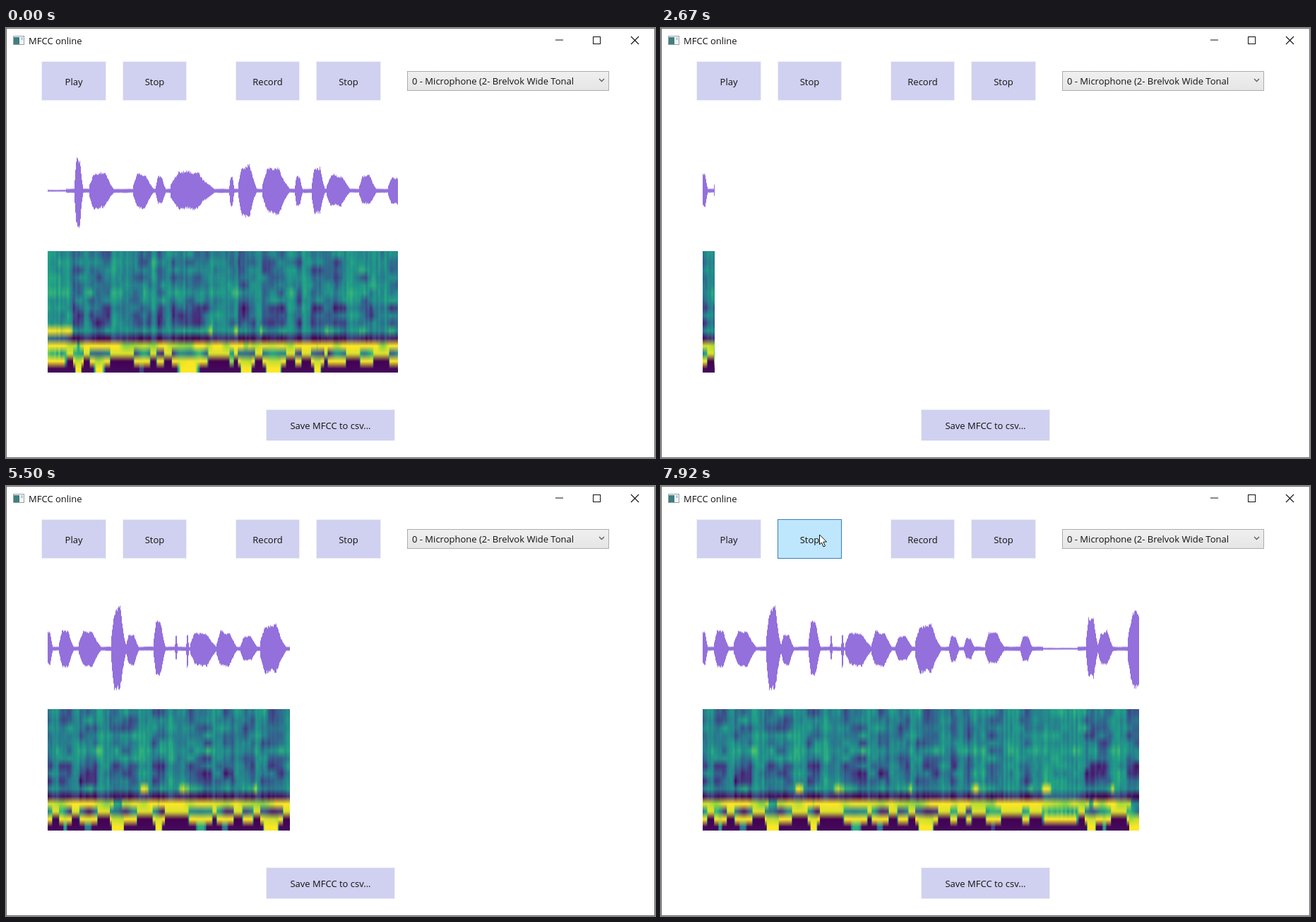
An HTML page with a canvas that plays this animation: 919 px wide and 609 px high, repeating every 8 s.

```html
<!DOCTYPE html>
<html lang="en">
<head>
<meta charset="utf-8">
<title>MFCC online</title>
<style>
html, body { margin: 0; width: 100%; height: 100%; overflow: hidden; background: #fff; }
canvas { display: block; }
</style>
</head>
<body>
<canvas id="stage" width="919" height="609"></canvas>
<script>
const ctx = document.getElementById('stage').getContext('2d');
const LOOP = 8000, FRAME = 1000 / 12;
const LEFT = 59, WIDTH = 789, AXIS = 230.5, ROWS = 16;
const CHUNK = 17.17, CHUNK_MS = 150;

// Spoken syllables: start, end, loudness
const FIRST = [
  [97, 110, 46], [118, 156, 27], [180, 212, 23], [212, 228, 19], [233, 302, 27],
  [316, 324, 20], [329, 357, 37], [363, 405, 32], [409, 421, 21], [433, 453, 35],
  [454, 491, 22], [500, 527, 21], [541, 572, 20], [575, 593, 13], [595, 625, 12],
  [627, 671, 33], [702, 727, 24], [740, 775, 36], [793, 820, 27], [832, 860, 20]
];
const SECOND = [
  [56, 67, 24], [75, 98, 25], [103, 138, 24], [149, 172, 54], [170, 190, 22],
  [209, 227, 37], [239, 243, 18], [255, 259, 24], [261, 302, 25], [298, 330, 24],
  [332, 359, 16], [360, 400, 33], [408, 424, 18], [429, 446, 15], [459, 489, 23],
  [509, 528, 16], [602, 620, 46], [619, 642, 25], [661, 700, 50]
];

const VIRIDIS = [
  [68, 1, 84], [70, 50, 126], [54, 92, 141], [39, 127, 142],
  [31, 161, 135], [74, 193, 109], [160, 218, 57], [253, 231, 37]
];

const clamp = v => Math.max(0, Math.min(1, v));
const ramp = (a, b, v) => clamp((v - a) / (b - a));
const mix = (a, b, k) => a + (b - a) * k;

function hash(a, b) {
  const s = Math.sin(a * 127.1 + b * 311.7) * 43758.5453;
  return s - Math.floor(s);
}

function noise(lane, x) {
  const i = Math.floor(x), f = x - i;
  return mix(hash(lane, i), hash(lane, i + 1), f * f * (3 - 2 * f));
}

function viridis(v) {
  const p = clamp(v) * (VIRIDIS.length - 1);
  const i = Math.min(Math.floor(p), VIRIDIS.length - 2);
  return VIRIDIS[i].map((c, n) => mix(c, VIRIDIS[i + 1][n], p - i));
}

// Quick attack, plateau, slower decay; a faint murmur around each syllable
function loudness(words, x) {
  let level = 1.2;
  for (const [start, end, peak] of words) {
    if (x > start - 13 && x < end + 13) level = Math.max(level, 2.8);
    const u = (x - start) / (end - start);
    if (u < 0 || u > 1) continue;
    const attack = Math.min(1, 0.35 + u * 4), decay = Math.min(1, (1 - u) * 2.2);
    level = Math.max(level, peak * attack * Math.sqrt(decay) * decay);
  }
  return level;
}

// One cepstral coefficient; row 0 is the lowest band
function coefficient(row, x, amp, seed) {
  const silent = ramp(2.4, 1.6, amp);
  const low = ramp(12, 9, amp) * (1 - silent);
  const loud = ramp(22, 27, amp);
  const quiet = ramp(14, 4, amp);
  const slow = noise(seed + row, x / 13);
  const streak = noise(seed + 40, x / 3) - 0.5;
  const fine = noise(seed + row + 60, x / 4) - 0.5;
  const column = 0.12 * quiet + 0.15 * streak;
  const glow = ramp(0.6, 0.8, slow) * (0.2 + 0.8 * quiet);
  switch (row) {
    case 0: return 0.02 + loud;
    case 1: return 1 - low - 0.15 * slow * loud;
    case 2: return mix(mix(0.05 + 0.65 * slow, 0.95, low), 0.62 + 0.3 * streak, silent);
    case 3: return 1.1 - 0.3 * slow - 0.4 * ramp(32, 42, amp);
    case 4: return 0.04 + column + 0.15 * silent;
    case 5: return 0.36 + 0.16 * slow + column + 0.35 * glow;
  }
  const contrast = 0.36 * (1 - 0.6 * quiet);
  const dip = row < 9 ? 0.12 * (1 - quiet) : row === 10 ? -0.08 : 0;
  return 0.38 + (slow - 0.5) * contrast + column + 0.08 * fine - dip;
}

function layer(w, h) {
  const c = document.createElement('canvas');
  c.width = w;
  c.height = h;
  return c;
}

function makeTake(words, seed) {
  const wave = layer(WIDTH, 130), spec = layer(WIDTH, ROWS);
  const pen = wave.getContext('2d'), bands = spec.getContext('2d');
  const img = bands.createImageData(WIDTH, ROWS);
  pen.fillStyle = '#9370db';
  for (let i = 0; i < WIDTH; i++) {
    const x = LEFT + i, level = loudness(words, x);
    const reach = side => level * (0.76 + 0.26 * noise(seed + side, x / 8) + 0.14 * hash(seed + side, x));
    const up = reach(1), down = reach(2);
    pen.fillRect(i, 65 - up, 1, up + down);

    let amp = 0;
    for (let d = -4; d <= 4; d += 2) amp += loudness(words, x + d) / 5;
    for (let row = 0; row < ROWS; row++) {
      const rgb = viridis(coefficient(row, x, amp, seed));
      img.data.set([...rgb, 255], ((ROWS - 1 - row) * WIDTH + i) * 4);
    }
  }
  bands.putImageData(img, 0, 0);
  return { wave, spec };
}

const first = makeTake(FIRST, 3);
const second = makeTake(SECOND, 211);

function box(x, y, w, h, fill, stroke) {
  ctx.fillStyle = fill;
  ctx.fillRect(x, y, w, h);
  if (!stroke) return;
  ctx.strokeStyle = stroke;
  ctx.lineWidth = 1;
  ctx.strokeRect(x + 0.5, y + 0.5, w - 1, h - 1);
}

function label(text, x, y, align = 'left') {
  ctx.font = '13px "Open Sans", "Noto Sans", sans-serif';
  ctx.textAlign = align;
  ctx.fillStyle = '#111';
  ctx.fillText(text, x, y);
}

function button(text, x, y, w, h, hover) {
  if (hover) box(x - 1, y - 1, w + 2, h + 2, '#bee6fd', '#3c7fb1');
  else box(x - 1, y - 1, w + 2, h + 2, '#d0d0f0', '#f0f0fa');
  label(text, x + w / 2, y + h / 2 + 5.5, 'center');
}

function line(color, width, ...pts) {
  ctx.strokeStyle = color;
  ctx.lineWidth = width;
  ctx.beginPath();
  for (let i = 0; i < pts.length; i += 2) ctx.lineTo(pts[i], pts[i + 1]);
  ctx.stroke();
}

function drawWindow(hover) {
  box(0, 0, 919, 609, '#fff', '#6c6c6c');
  box(10, 11, 16, 13, '#f4f6f8', '#9a9fa3');
  box(11, 13, 8, 10, '#3f7f80');
  box(21, 13, 3, 4, '#b9cfe4');
  label('MFCC online', 32, 23);
  line('#111', 1, 778, 17, 789, 17);
  ctx.strokeRect(831.5, 12.5, 10, 10);
  line('#111', 1.1, 885, 12, 896, 23);
  line('#111', 1.1, 896, 12, 885, 23);

  button('Play', 51, 48, 90, 54);
  button('Stop', 166, 48, 89, 54, hover);
  button('Record', 326, 48, 89, 54);
  button('Stop', 440, 48, 90, 54);
  button('Save MFCC to csv...', 369, 541, 181, 43);

  const shade = ctx.createLinearGradient(0, 61, 0, 89);
  shade.addColorStop(0, '#f0f0f0');
  shade.addColorStop(1, '#e5e5e5');
  box(568, 61, 286, 28, shade, '#acacac');
  label('0 - Microphone (2- Brelvok Wide Tonal', 575, 80);
  line('#606060', 1.4, 840, 72, 843.5, 75.5, 847, 72);
}

function drawTake(take, width) {
  const w = Math.min(Math.round(width), WIDTH);
  if (w < 1) return;
  ctx.drawImage(take.wave, 0, 0, w, 130, LEFT, AXIS - 65, w, 130);
  ctx.drawImage(take.spec, 0, 0, w, ROWS, LEFT, 315.7, w, 172);
}

function drawCursor(x, y) {
  ctx.beginPath();
  for (const [dx, dy] of [[0, 0], [0, 14], [3, 11], [5.6, 17], [8, 16], [5.4, 10.2], [10, 10]])
    ctx.lineTo(x + dx, y + dy);
  ctx.closePath();
  ctx.fillStyle = '#fff';
  ctx.fill();
  ctx.strokeStyle = '#111';
  ctx.lineWidth = 1;
  ctx.stroke();
}

function draw(ms) {
  // The recorder repaints twelve times a second and receives audio in chunks
  const t = Math.floor((ms % LOOP) / FRAME + 0.001) * FRAME;
  const chunk = Math.floor((t + 70) / CHUNK_MS);
  const k = ramp(7000, 7250, t), ease = k * (2 - k);
  const cx = mix(345, 224.5, ease), cy = mix(186, 69, ease);
  const pointer = t >= 6999;
  drawWindow(pointer && cx < 255 && cy < 102);
  if (chunk < 18) drawTake(first, 495.6 + chunk * CHUNK);
  else drawTake(second, (chunk - 17) * CHUNK);
  if (pointer) drawCursor(cx, cy);
}

const began = performance.now();
function tick() {
  draw(performance.now() - began);
  requestAnimationFrame(tick);
}
tick();
</script>
</body>
</html>
```
